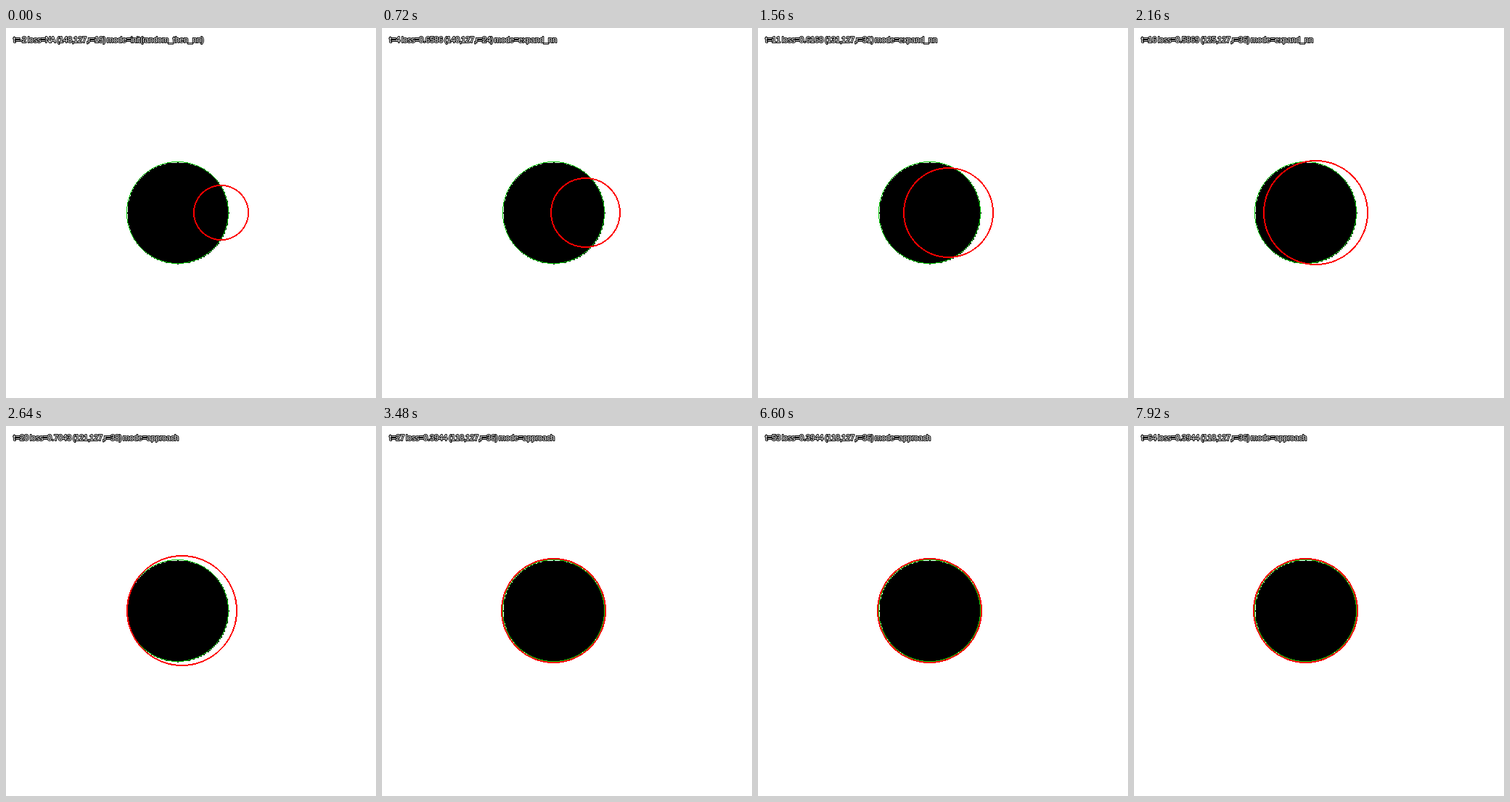
These frames come from a looping animation (510 by 510 pixels, 8 s). An HTML page with a canvas:

```html
<!DOCTYPE html>
<html lang="en">
<head>
<meta charset="utf-8">
<title>Circle fitting</title>
<style>
html, body { margin: 0; width: 100%; height: 100%; overflow: hidden; background: #fff; }
canvas { display: block; width: 510px; height: 510px; }
</style>
</head>
<body>
<canvas id="stage" width="510" height="510"></canvas>
<script>
const LOOP = 8000, STEP = 120, SCALE = 2;
const EXPAND_END = 19, APPROACH_STEPS = 7;
const GOAL = { x: 118, y: 127, r: 35 };

const ctx = document.getElementById('stage').getContext('2d');
const mix = (from, to, part) => from + (to - from) * part;

// The circle grows by one per step while its right edge eases to a stop.
function expanding(step) {
  const r = Math.max(19, 20 + step);
  const edge = Math.floor(161.35 + 0.0133 * (EXPAND_END - step) ** 2);
  const loss = step < 0 ? 'NA' : mix(0.6586, 0.6168, (step - 4) / 7).toFixed(4);
  return { x: edge - r, r, loss, mode: step < 0 ? 'init(random_then_nn)' : 'expand_nn' };
}

function approaching(step) {
  const part = Math.min(1, (step - EXPAND_END - 1) / APPROACH_STEPS);
  return {
    x: Math.round(mix(121, 118, part)),
    r: Math.round(mix(38, 36, part)),
    loss: mix(0.7043, 0.3944, part).toFixed(4),
    mode: 'approach'
  };
}

// Fills every hard-edged block around a centre that passes the test.
function blocks(cx, cy, reach, size, color, test) {
  ctx.fillStyle = color;
  for (let y = -reach; y <= reach; y++) {
    for (let x = -reach; x <= reach; x++) {
      if (test(Math.abs(x), Math.abs(y))) ctx.fillRect((cx + x) * size, (cy + y) * size, size, size);
    }
  }
}

function disc({ x, y, r }, color) {
  blocks(x, y, r, SCALE, color, (dx, dy) => dx * dx + dy * dy <= r * r);
}

// Rounds along the longer axis, as a midpoint circle does.
function ring(x, y, r, width, color) {
  const outer = r * SCALE, inner = outer - width + 1;
  const along = (radius, minor) => Math.sqrt(Math.max(0, radius * radius - minor * minor));
  blocks(x * SCALE, y * SCALE, outer, 1, color, (dx, dy) => {
    const major = Math.max(dx, dy), minor = Math.min(dx, dy);
    return major <= along(outer, minor) + 0.5 && major > along(inner, minor) - 0.5;
  });
}

// Whole-pixel advances, with tight spaces and commas.
function outlinedText(text, left, baseline) {
  ctx.font = '11px "Liberation Sans", Arial, sans-serif';
  ctx.lineWidth = 2;
  ctx.lineJoin = 'round';
  ctx.strokeStyle = '#000';
  ctx.fillStyle = '#fff';
  for (const paint of ['strokeText', 'fillText']) {
    let x = left;
    for (const char of text) {
      ctx[paint](char, x, baseline);
      x += Math.floor(ctx.measureText(char).width) - (' ,'.includes(char) ? 1 : 0);
    }
  }
}

function draw(step) {
  const { x, r, loss, mode } = step <= EXPAND_END ? expanding(step) : approaching(step);
  ctx.fillStyle = '#fff';
  ctx.fillRect(0, 0, 510, 510);
  disc(GOAL, '#000');
  ring(GOAL.x, GOAL.y, GOAL.r, 1, 'rgb(0, 200, 0)');
  ring(x, GOAL.y, r, 2, '#f00');
  outlinedText(`t=${step} loss=${loss} (${x},${GOAL.y},r=${r}) mode=${mode}`, 10, 20);
}

const start = performance.now();
let shown = null;
function tick() {
  const step = Math.floor(((performance.now() - start) % LOOP) / STEP) - 2;
  if (step !== shown) draw(shown = step);
  requestAnimationFrame(tick);
}
tick();
</script>
</body>
</html>
```
